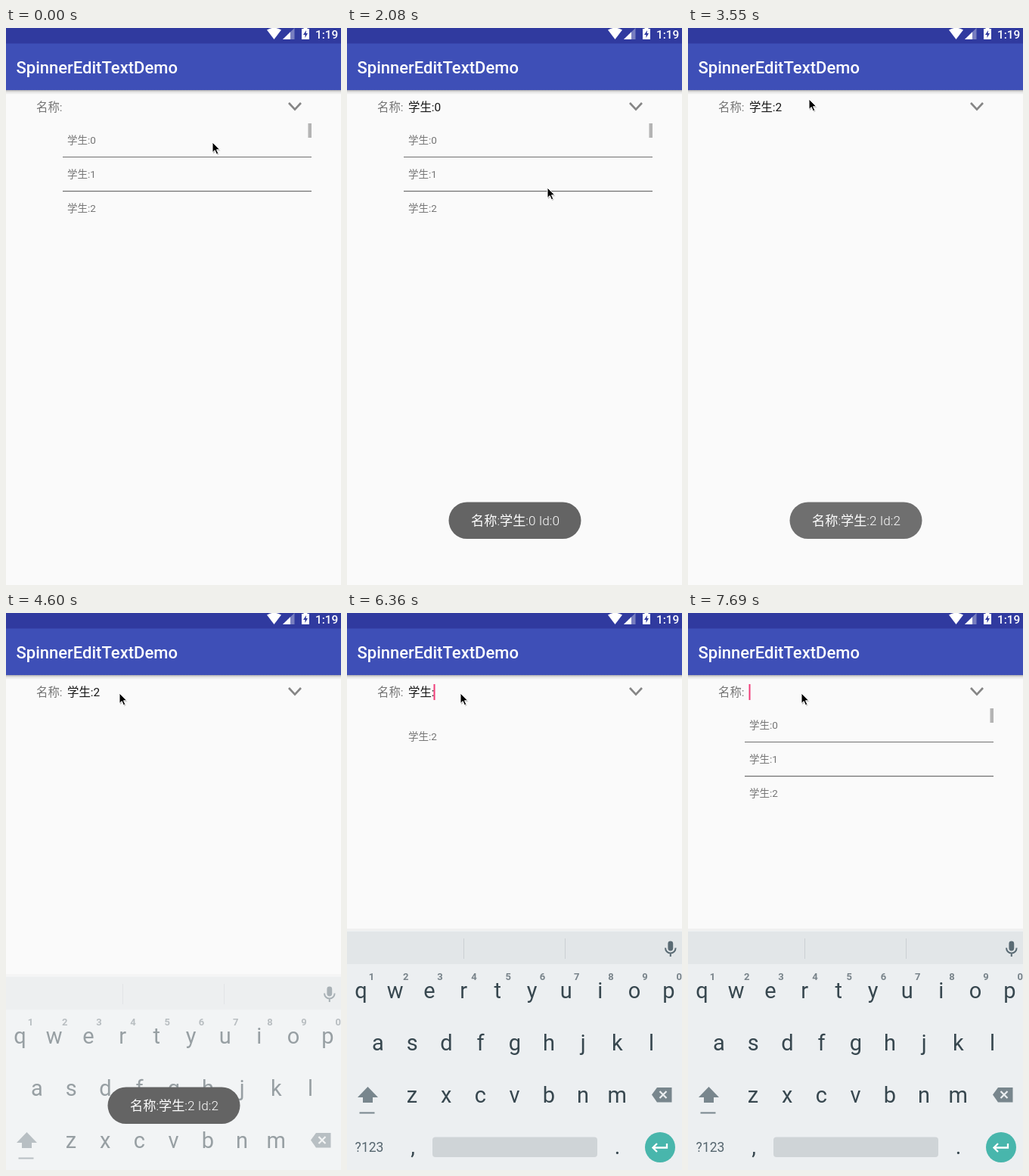
Animation of 443x736 px, one loop 7.99 s. Source, as an HTML page:

```html
<!DOCTYPE html>
<html lang="zh-CN">
<head>
<meta charset="utf-8">
<title>SpinnerEditTextDemo</title>
<style>
html, body { margin: 0; width: 100%; height: 100%; overflow: hidden; background: #fafafa; }
svg { display: block; width: 443px; height: 736px; }
text { font-family: Roboto, "Noto Sans CJK SC", "Noto Sans CJK", sans-serif; white-space: pre; }
.mid { text-anchor: middle; }
.key { font-size: 29px; fill: #37474f; }
.hint { font-size: 13px; font-weight: 700; fill: #78838a; }
.row { font-size: 13.5px; fill: #757575; }
.field { font-size: 15.4px; }
</style>
</head>
<body>
<svg viewBox="0 0 443 736">
  <defs>
    <linearGradient id="shade" x2="0" y2="1">
      <stop offset="0" stop-color="#000" stop-opacity=".3"/>
      <stop offset=".4" stop-color="#000" stop-opacity=".1"/>
      <stop offset="1" stop-color="#000" stop-opacity="0"/>
    </linearGradient>
    <clipPath id="listClip"><rect x="75" y="126" width="330" height="125"/></clipPath>
  </defs>
  <rect width="443" height="736" fill="#fafafa"/>

  <rect y="82" width="443" height="6" fill="url(#shade)"/>
  <rect y="20" width="443" height="62" fill="#3e4fb7"/>
  <rect width="443" height="20.5" fill="#303a9f"/>
  <text x="13.5" y="59.5" font-size="22" font-weight="500" fill="#fff">SpinnerEditTextDemo</text>
  <g fill="#fff">
    <path d="M345 2.5Q354.5-3 364 2.5L354.5 15Z"/>
    <path d="M366 15L381.500 0V15Z" opacity=".35"/>
    <path d="M366 15L376 5.300V15Z"/>
    <path d="M391 1H393.500V-1H398.500V1H401V15H391Z"/>
    <path d="M397 3L393 9H395.500V13L399 7H396.700Z" fill="#303a9f"/>
    <text x="409" y="13.500" font-size="15.400" font-weight="500">1:19</text>
  </g>

  <text class="field" x="40" y="109.500" fill="#757575">名称:</text>
  <text class="field" id="value" x="81" y="109.500" fill="#151515"></text>
  <path d="M374 99L382 107.700L390 99" fill="none" stroke="#858585" stroke-width="2.600"/>
  <g id="list">
    <g clip-path="url(#listClip)" id="rows">
      <path d="M75 170.500H404M75 215.600H404" stroke="#707070" stroke-width="1.200"/>
      <rect x="399.500" y="126" width="4.500" height="19" fill="#b4b4b4"/>
    </g>
  </g>
  <text class="row" id="match" x="81" y="153">学生:2</text>
  <rect id="caret" y="94" width="2" height="21" fill="#f03c78"/>
  <path id="handle" d="M124 114.500L131.800 121.500A11 11 0 1 1 116.200 121.500Z" fill="#ff4081"/>

  <g id="keyboard">
    <rect y="417" width="443" height="4" fill="#000" opacity=".04"/>
    <rect y="420" width="443" height="316" fill="#eceff1"/>
    <rect y="421" width="443" height="43" fill="#e2e6e8"/>
    <path d="M154.500 430V457M288.500 430V457" stroke="#cbd0d3"/>
    <g stroke="#5a6b74" fill="none" stroke-width="2">
      <rect x="425.400" y="434.400" width="4.800" height="11" rx="2.400" fill="#5a6b74"/>
      <path d="M421 442.500A6.800 7 0 0 0 434.600 442.500M427.800 449V454"/>
    </g>
    <g fill="#78868d">
      <path d="M27.500 626L41 640H34V647H21V640H14Z"/>
      <rect x="16.500" y="659.500" width="20" height="2"/>
      <path d="M403 636.500L410 627H429.500V646.500H410Z"/>
    </g>
    <path d="M413.500 632L422.500 641M422.500 632L413.500 641" stroke="#eceff1" stroke-width="2.200"/>
    <rect x="113" y="692.500" width="218" height="26.500" rx="4" fill="#cfd4d7"/>
    <text class="mid" x="29.500" y="712" font-size="17.500" fill="#56666f">?123</text>
    <circle cx="414" cy="706" r="20" fill="#48b6ac"/>
    <path d="M423 701V706.500H405M410 701L404.500 706.500L410 712" fill="none" stroke="#fff" stroke-width="2.300"/>
  </g>

  <g id="toast">
    <rect x="134.500" y="626.500" width="175" height="48.500" rx="24.200" fill="#646464"/>
    <text class="mid" id="message" x="222.500" y="657" font-size="17.200" font-weight="300" fill="#fff"></text>
  </g>
  <g id="mouse">
    <path d="M1 1.500V15L4.200 12 6.400 17 8.600 16 6.400 11.300H10.600Z" fill="#000" opacity=".25"/>
    <path d="M0 0V13.500L3.200 10.600 5.400 15.800 7.800 14.700 5.500 9.800H9.800Z" fill="#000" stroke="#fff" stroke-width="1"/>
  </g>
</svg>
<script>
const LOOP = 7990, TICK = 148;
const $ = id => document.getElementById(id);

const mouse = [[0, 273, 151], [4, 273, 151], [6, 293, 160], [10, 381, 104], [12, 381, 104],
  [14, 265, 211], [17, 242, 231], [20, 238, 234], [24, 160, 94], [26, 150, 106]];
const toast = [[4, 0], [6, .37], [8, 1], [17, 1], [19, 0], [20, 0], [22, .45], [24, .92], [25, 1],
  [35, 1], [36, .69], [38, 0]];
const value = [[0, ''], [4, '学生:0'], [21, '学生:2'], [42, '学生:'], [45, '学生'], [47, '学'], [50, '']];
const list = [[0, 1], [5, .4], [6, 0], [12, .5], [13, 1], [21, .4], [22, 0],
  [44, .5], [45, 1], [50, .6], [52, 1]];
const listShift = [[0, 0], [44, 15], [45, 0], [50, 15], [51, 5], [52, 0]];
const match = [[0, 0], [34, 1], [44, 0]];
const keyboard = [[0, 0], [31, .5], [32, 1]];
const blinks = [1, 7, 10, 14, 17, 20, 21, 24, 28, 31, 34, 38, 41];

function hold(track, k) {
  let v = track[0][1];
  for (const [t, x] of track) if (t <= k) v = x;
  return v;
}

function glide(track, k, c = 1) {
  const i = track.findIndex(p => p[0] > k);
  if (i === 0) return track[0][c];
  if (i < 0) return track[track.length - 1][c];
  const a = track[i - 1], b = track[i];
  return a[c] + (b[c] - a[c]) * (k - a[0]) / (b[0] - a[0]);
}

function label(parent, cls, x, y, str) {
  const el = document.createElementNS('http://www.w3.org/2000/svg', 'text');
  el.setAttribute('class', cls);
  el.setAttribute('x', x);
  el.setAttribute('y', y);
  el.textContent = str;
  parent.append(el);
}

const set = (id, name, v) => $(id).setAttribute(name, v);
const fade = (id, v) => set(id, 'opacity', v);

function build() {
  for (let i = 0; i < 3; i++) label($('rows'), 'row', 81, 153 + 45.2 * i, '学生:' + i);
  const keys = [['qwertyuiop', 18.5, 509], ['asdfghjkl', 41, 578], ['zxcvbnm', 86, 647]];
  for (const [row, x, y] of keys)
    [...row].forEach((c, i) => label($('keyboard'), 'key mid', x + 45.2 * i, y, c));
  [...'1234567890'].forEach((c, i) => label($('keyboard'), 'hint mid', 32.5 + 45.2 * i, 484.5, c));
  label($('keyboard'), 'key mid', 87, 715, ',');
  label($('keyboard'), 'key mid', 357.5, 715, '.');
}

function draw(ms) {
  const k = Math.floor((ms + 6) / TICK);
  const text = hold(value, k), id = k < 20 ? 0 : 2;
  $('value').textContent = text;
  $('message').textContent = `名称:学生:${id} Id:${id}`;
  set('caret', 'x', 80.5 + (text ? $('value').getComputedTextLength() - .5 : 0));
  fade('caret', blinks.filter(t => t <= k).length % 2);
  fade('handle', +(k >= 32 && k < 42));
  fade('list', hold(list, k));
  set('list', 'transform', `translate(0 ${hold(listShift, k)})`);
  fade('match', hold(match, k));
  set('match', 'y', k === 43 ? 168 : 153);
  fade('keyboard', hold(keyboard, k));
  set('keyboard', 'transform', `translate(0 ${k === 31 ? 60 : 0})`);
  fade('toast', glide(toast, k));
  set('mouse', 'transform', `translate(${glide(mouse, k)} ${glide(mouse, k, 2)})`);
}

build();
const start = performance.now();
function frame() {
  draw((performance.now() - start) % LOOP);
  requestAnimationFrame(frame);
}
frame();
</script>
</body>
</html>
```
